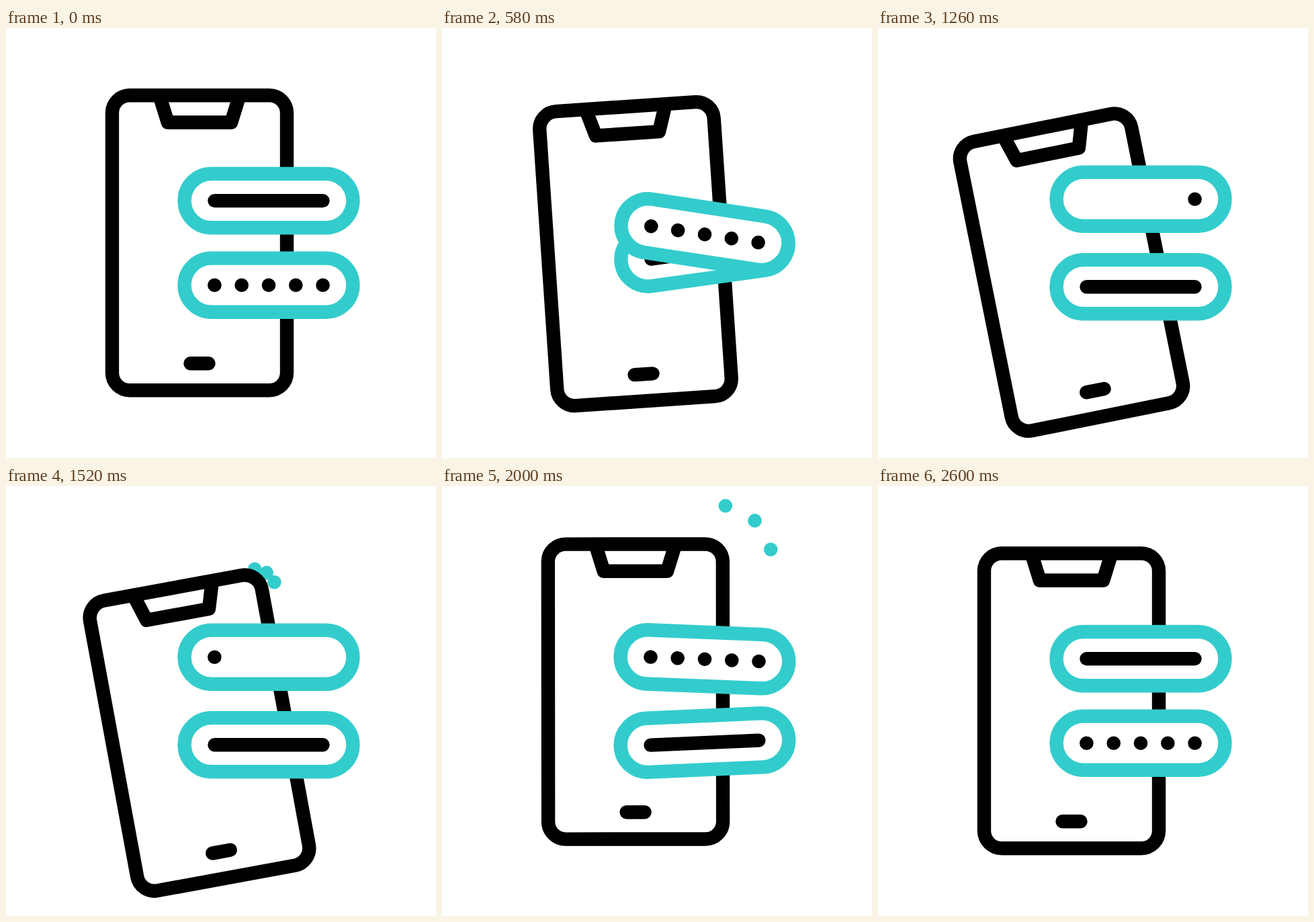
An HTML page that plays this animation: 640x640 px, repeating every 3000 ms.

```html
<!DOCTYPE html>
<html lang="en">
<head>
<meta charset="utf-8">
<title>Phone sign-in</title>
<style>
  html, body { margin: 0; width: 100%; height: 100%; overflow: hidden; background: #fff; }
  svg { display: block; width: 100%; height: 100%; }
  .ink, .teal { fill: none; stroke-width: 20.4; stroke-linecap: round; stroke-linejoin: round; }
  .ink { stroke: #000; }
  .teal { stroke: #3cc; }
  .body { fill: #fff; }
</style>
</head>
<body>
<svg viewBox="0 0 640 640">
  <g id="phone">
    <g id="sparks" fill="#3cc"></g>
    <rect class="ink body" x="-130" y="-219.5" width="260" height="439" rx="26"/>
    <path class="ink" style="stroke-linecap:butt" d="M-59.7-219.5L-47.2-179.3H47.2L59.7-219.5"/>
    <path class="ink" d="M-13.5 179.5H13.5"/>
  </g>
  <g id="name">
    <rect class="teal body" x="-125.4" y="-40.1" width="250.8" height="80.2" rx="40.1"/>
    <path class="ink" d="M-80.5 0H80.5"/>
    <path id="glow" class="teal" style="stroke-width:23" d="M-80.5 0H80.5"/>
  </g>
  <g id="pass">
    <rect class="teal body" x="-125.4" y="-40.1" width="250.8" height="80.2" rx="40.1"/>
    <g id="dots"></g>
  </g>
</svg>
<script>
const LOOP = 3000, DOT = 10.3;
const $ = id => document.getElementById(id);

function addDot(parent, x) {
  const c = document.createElementNS("http://www.w3.org/2000/svg", "circle");
  c.setAttribute("cx", x);
  c.setAttribute("r", DOT);
  return parent.appendChild(c);
}

const dots = Array.from({ length: 5 }, (_, i) => addDot($("dots"), (i - 2) * 40.3));
const sparks = Array.from({ length: 3 }, () => addDot($("sparks"), 0));

// Progress of a step from time a to time b, linear and eased
const part = (t, a, b) => Math.min(1, Math.max(0, (t - a) / (b - a)));
const ease = (t, a, b) => {
  const x = part(t, a, b);
  return x * x * (3 - 2 * x);
};
const bell = (t, a, b) => Math.sin(Math.PI * part(t, a, b));
const mix = (a, b, k) => a + (b - a) * k;

const place = (id, x, y, turn) =>
  $(id).setAttribute("transform", `translate(${x} ${y}) rotate(${turn})`);
const show = (el, on) => el.setAttribute("visibility", on ? "visible" : "hidden");

// The phone leans back, dips, springs past upright and settles
function drawPhone(t) {
  const turn = -10.7 * ease(t, 200, 1140) - 1.6 * ease(t, 1180, 1360)
    + 13.3 * ease(t, 1330, 2140) - ease(t, 2140, 2600);
  const drop = 42.5 * ease(t, 200, 1100) + 7.5 * ease(t, 1220, 1370)
    - 64 * ease(t, 1468, 1954) + 14 * ease(t, 1954, 2500);
  place("phone", 288, 319.75 + drop, turn);
}

// The fields trade places, the rising one tilting a little more
function drawFields(t) {
  const swap = ease(t, 200, 880) - ease(t, 1940, 2600);
  const go = bell(t, 200, 880), back = bell(t, 1940, 2600);
  place("name", 391, mix(257.1, 385.2, swap), -8 * go - 8.8 * back);
  place("pass", 391, mix(382.7, 254.7, swap), 8.8 * go + 8 * back);

  show($("glow"), t >= 880 && t < 1880 && Math.floor((t - 880) / 200) % 2 === 0);
  dots.forEach((d, i) => show(d, t < 880 + 100 * i || t >= 1500 + 100 * i));
}

// Sparks fan out from behind the phone's corner
function drawSparks(t) {
  const rest = 1 - part(t, 1380, 2060);
  const dist = 84.4 * (1 - rest * rest);
  sparks.forEach((s, i) => {
    const angle = (-80 + 34 * i) * Math.PI / 180;
    s.setAttribute("cx", 119.5 + dist * Math.cos(angle));
    s.setAttribute("cy", -194 + dist * Math.sin(angle));
    s.setAttribute("r", DOT * (1 - part(t, 2270, 2360)));
    show(s, t > 1380 && t < 2360);
  });
}

function draw(t) {
  drawPhone(t);
  drawFields(t);
  drawSparks(t);
}

const start = performance.now();
function tick() {
  draw((performance.now() - start) % LOOP);
  requestAnimationFrame(tick);
}
draw(0);
requestAnimationFrame(tick);
</script>
</body>
</html>
```
